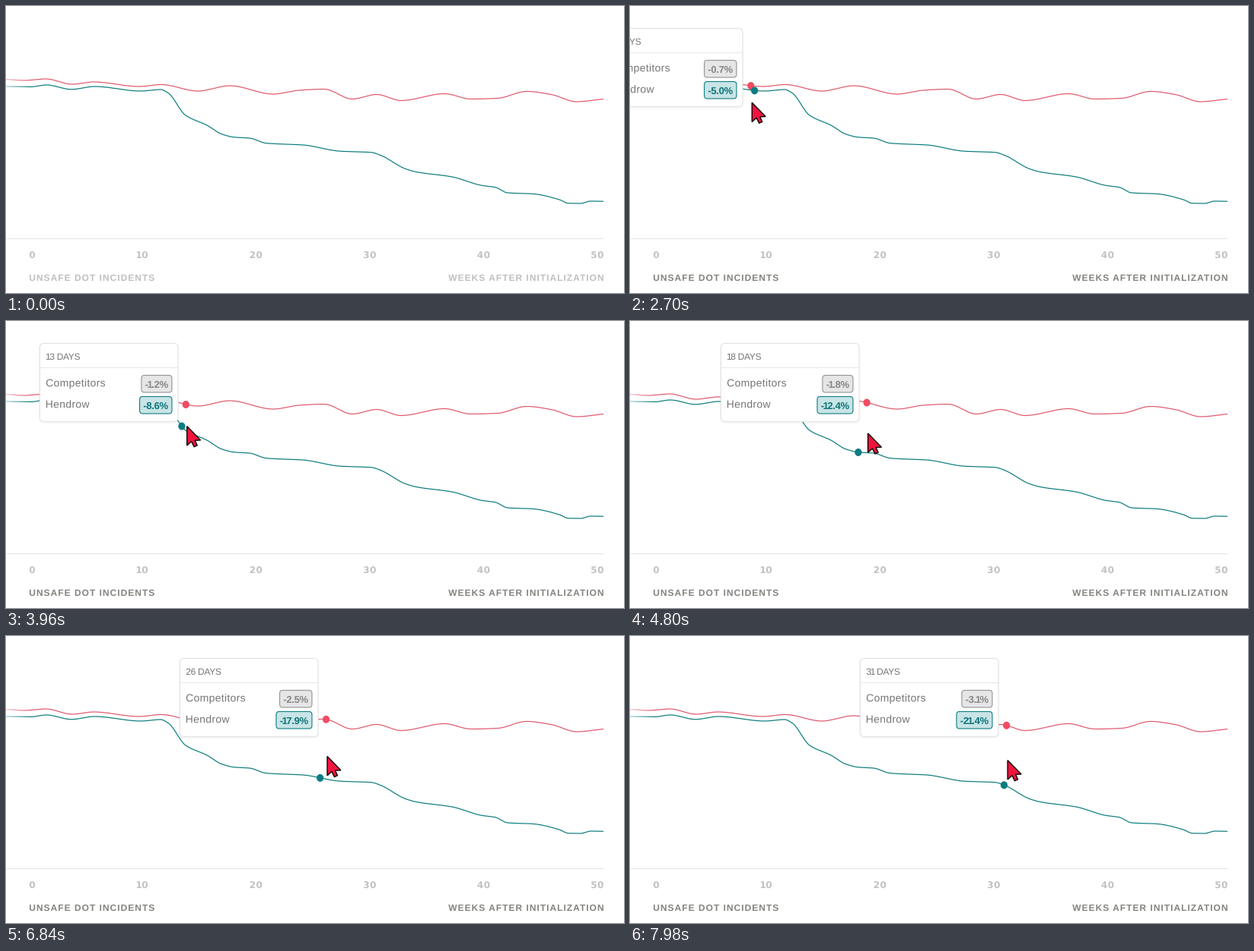
Write a matplotlib script that moves like this. It is 812 by 378 pixels and loops after 8 s.

```python
import math

import numpy as np
import matplotlib.pyplot as plt
from matplotlib.animation import FuncAnimation
from matplotlib.patches import Ellipse, FancyBboxPatch, PathPatch, Polygon
from matplotlib.path import Path
from matplotlib.textpath import TextPath

W, H, DPI = 812, 378, 64
PX = 72 / DPI                      # points per pixel
LOOP, STEP, TICK = 8000, 20, 30    # ms
EDGE = 785                         # right end of the chart

RED, TEAL, GREY = "#e0576a", "#0b7b7b", "#767676"


# ---------- curves and motion ----------

def smooth(points):
    """Monotone cubic through the points, held level beyond both ends."""
    px, py = np.array(points, float).T
    h = np.diff(px)
    d = np.diff(py) / h
    m = np.concatenate([[d[0]], np.zeros(len(px) - 2), [d[-1]]])
    for i in range(1, len(px) - 1):
        if d[i - 1] * d[i] > 0:
            w1, w2 = 2 * h[i] + h[i - 1], h[i] + 2 * h[i - 1]
            m[i] = (w1 + w2) / (w1 / d[i - 1] + w2 / d[i])

    def curve(x):
        x = np.clip(x, px[0], px[-1])
        i = np.clip(np.searchsorted(px, x, side="right") - 1, 0, len(h) - 1)
        u = (x - px[i]) / h[i]
        return (py[i] * (1 + 2 * u) * (1 - u) ** 2
                + h[i] * m[i] * u * (1 - u) ** 2
                + py[i + 1] * u * u * (3 - 2 * u)
                + h[i] * m[i + 1] * u * u * (u - 1))
    return curve


# Crests, troughs and bends only; the rest follows from the interpolation.
rivals = smooth([
    (0, 96.5), (24, 98), (52, 96), (87, 103), (115, 100), (175, 106),
    (204, 103.5), (252, 112), (294, 105), (351, 116), (385, 111),
    (418, 109.5), (455, 122.5), (487, 116.5), (519, 124.5), (576, 115.5),
    (611, 122.5), (646, 121.5), (684, 112.5), (716, 116.5), (750, 126),
    (785, 122.5)])

ours = smooth([
    (0, 106), (32, 106.5), (53, 104), (86, 109.8), (116, 106), (177, 112),
    (203, 110), (213, 114.5), (236, 144), (264, 157), (283, 168.5),
    (300, 172.8), (320, 174), (342, 180.7), (390, 183), (439, 191.2),
    (480, 192.8), (492, 196.5), (525, 214.5), (539, 218.5), (586, 225),
    (625, 236.3), (643, 238.8), (659, 246), (692, 247.4), (727, 255),
    (739, 259.8), (755, 260), (768, 257), (785, 257.3)])

xs = np.linspace(0, EDGE, 1571)


def arc_share(curve):
    steps = np.hypot(np.diff(xs), np.diff(curve(xs)))
    total = np.concatenate([[0], np.cumsum(steps)])
    return total / total[-1]


rivals_share, ours_share = arc_share(rivals), arc_share(ours)

# Time, place of the red dot, drop shown in percent.
KEYS = [(810, -30, 0), (1380, 65.5, 0.7), (2700, 158.5, 5.02),
        (3960, 236, 8.6), (4860, 315, 12.6), (5730, 361, 15.02),
        (6480, 409, 17.4), (6840, 420.3, 17.88), (7980, 494.4, 21.43)]
travel = smooth([(t, x) for t, x, _ in KEYS])
counter = smooth([(t, drop) for t, _, drop in KEYS])


def pointer_y(x):
    return 98.5 + 0.205 * x - 0.000148 * x * x


# ---------- text ----------

cache = {}


def glyphs(text, size, weight="normal", track=0.0, family="Liberation Sans"):
    """Letter-spaced outline starting at x = 0; returns vertices, codes, width."""
    key = (text, size, weight, track, family)
    if key not in cache:
        font = {"family": family, "weight": weight}
        verts, codes, shift = [], [], 0.0
        for i, ch in enumerate(text):
            if ch == " ":
                shift += track
                continue
            glyph = TextPath((0, 0), ch, size=size, prop=font)
            run = TextPath((0, 0), text[:i + 1], size=size, prop=font)
            pen = run.get_extents().x1 - glyph.get_extents().x1
            tuck = 0.09 * size if ch == "1" else 0   # proportional ones
            shift -= tuck
            verts.append(glyph.vertices + [pen + shift, 0])
            codes.append(glyph.codes)
            shift += track - tuck
        verts, codes = np.concatenate(verts), np.concatenate(codes)
        box = Path(verts, codes).get_extents()
        cache[key] = ((verts - [box.x0, 0]) * [1, -1], codes, box.width)
    return cache[key]


def placed(shape, x, y):
    return Path(shape[0] + [x, y], shape[1])


def ink(shape, x, y, color, z=2):
    patch = PathPatch(placed(shape, x, y), fc=color, lw=0, zorder=z)
    return ax.add_patch(patch)


def title_text(days):
    return glyphs(f"{days} DAYS", 12, track=-0.3)


def badge_text(amount):
    return glyphs(f"-{amount:.1f}%", 13, "bold", -0.3)


# ---------- stage ----------

fig = plt.figure(figsize=(W / DPI, H / DPI), dpi=DPI, facecolor="white")
ax = fig.add_axes([0, 0, 1, 1])
ax.axis("off")

ax.plot([0, EDGE], [305.5, 305.5], color="#e4e4e4", lw=PX,
        solid_capstyle="butt", zorder=1)
for curve, color in ((rivals, RED), (ours, TEAL)):
    ax.plot(xs, curve(xs), color=color, lw=1.2 * PX,
            solid_capstyle="butt", zorder=1)

# The lines fade in from the left edge.
veil = np.ones((1, 32, 4))
veil[0, :, 3] = np.linspace(0.62, 0, 32)
ax.imshow(veil, extent=(0, 32, 113, 90), aspect="auto", zorder=1.5)
ax.set_xlim(0, W)
ax.set_ylim(H, 0)

for week in range(0, 51, 10):
    shape = glyphs(str(week), 12, "bold", 0.5, "DejaVu Sans")
    mid = 29 + 14.95 * week + (5.5 if week == 0 else 0.5)
    ink(shape, mid - shape[2] / 2, 332, "#c2c2c2")

captions = [ink(glyphs(text, 12, "bold", 1.0), x, 362, "#c0c0c0")
            for text, x in (("UNSAFE DOT INCIDENTS", 31),
                            ("WEEKS AFTER INITIALIZATION", 581.3))]


# ---------- tooltip, dots and pointer ----------

def panel(y, w, h, radius, fc, ec, z, lw=1.0):
    style = f"round,pad=0,rounding_size={radius}"
    patch = FancyBboxPatch((0, y), w, h, boxstyle=style, fc=fc, ec=ec,
                           lw=lw * PX, zorder=z)
    return ax.add_patch(patch)


def dot(color):
    return ax.add_patch(Ellipse((0, 0), 9.2, 10, fc=color, lw=0, zorder=7))


CARD_W = 181.5
shade = panel(30, CARD_W, 103.5, 6, "none", (0, 0, 0, 0.03), 3, 3)
card = panel(29.5, CARD_W, 103, 5.5, "white", "#e2e2e2", 4)
rule, = ax.plot([], [], color="#e8e8e8", lw=PX, zorder=5)

title = ink(title_text(0), 0, 0, GREY, 5)
names = [glyphs(name, 14, track=0.3) for name in ("Competitors", "Hendrow")]
rows = [ink(shape, 0, 0, GREY, 5) for shape in names]

ROW = 28                           # distance between tooltip rows
SKINS = [("#e6e6e6", "#969696", "#878787"), ("#c8e4e6", "#158083", "#0d7578")]
badges = [panel(71.5 + ROW * k, 40, 22.5, 4, fc, ec, 5, 1.15)
          for k, (fc, ec, _) in enumerate(SKINS)]
values = [ink(badge_text(0), 0, 0, color, 6) for _, _, color in SKINS]

red_dot, teal_dot = dot("#f04c62"), dot("#0b7d82")

ARROW = np.array([(0, 0), (0, 25.3), (5.8, 20), (9.4, 27), (13.4, 25.2),
                  (10.4, 18.6), (17.8, 18.3)])
pointer = ax.add_patch(Polygon(ARROW, closed=True, fc="#f2143f", ec="#140a0c",
                               lw=1.5 * PX, joinstyle="miter", zorder=8))


def draw_card(x, drop):
    left = round(x - 192) + 0.5
    shade.set_x(left)
    card.set_x(left)
    rule.set_data([left + 0.5, left + CARD_W - 0.5], [60.5, 60.5])
    title.set_path(placed(title_text(math.ceil(drop / 0.692)), left + 8.4, 51))

    right = left + CARD_W - 8
    for k, amount in enumerate((drop / 7.02, drop)):
        rows[k].set_path(placed(names[k], left + 8.4, 86.3 + ROW * k))
        shape = badge_text(amount)
        width = shape[2] + 10.5
        badges[k].set_x(right - width)
        badges[k].set_width(width)
        values[k].set_path(placed(shape, right - width + 5.3, 88 + ROW * k))


def draw(i):
    t = i * STEP // TICK * TICK
    x = float(travel(t))

    fade = min(t / 1200, 1)
    tone = (192 - 60 * fade * (2 - fade)) / 255
    for caption in captions:
        caption.set_facecolor((tone, tone, tone - 0.02 * fade))

    draw_card(x, float(counter(t)))

    # Both dots have covered the same share of their line.
    share = np.interp(x, xs, rivals_share)
    teal_x = np.interp(share, ours_share, xs) + min(x, 0)
    red_dot.set_center((x + 0.3, float(rivals(x)) + 0.2))
    teal_dot.set_center((teal_x + 0.3, float(ours(teal_x)) + 0.2))
    pointer.set_xy(ARROW + [x + 1.8, pointer_y(x)])
    return []


anim = FuncAnimation(fig, draw, frames=LOOP // STEP, interval=STEP,
                     repeat=True, repeat_delay=0, blit=False)
plt.show()
```
